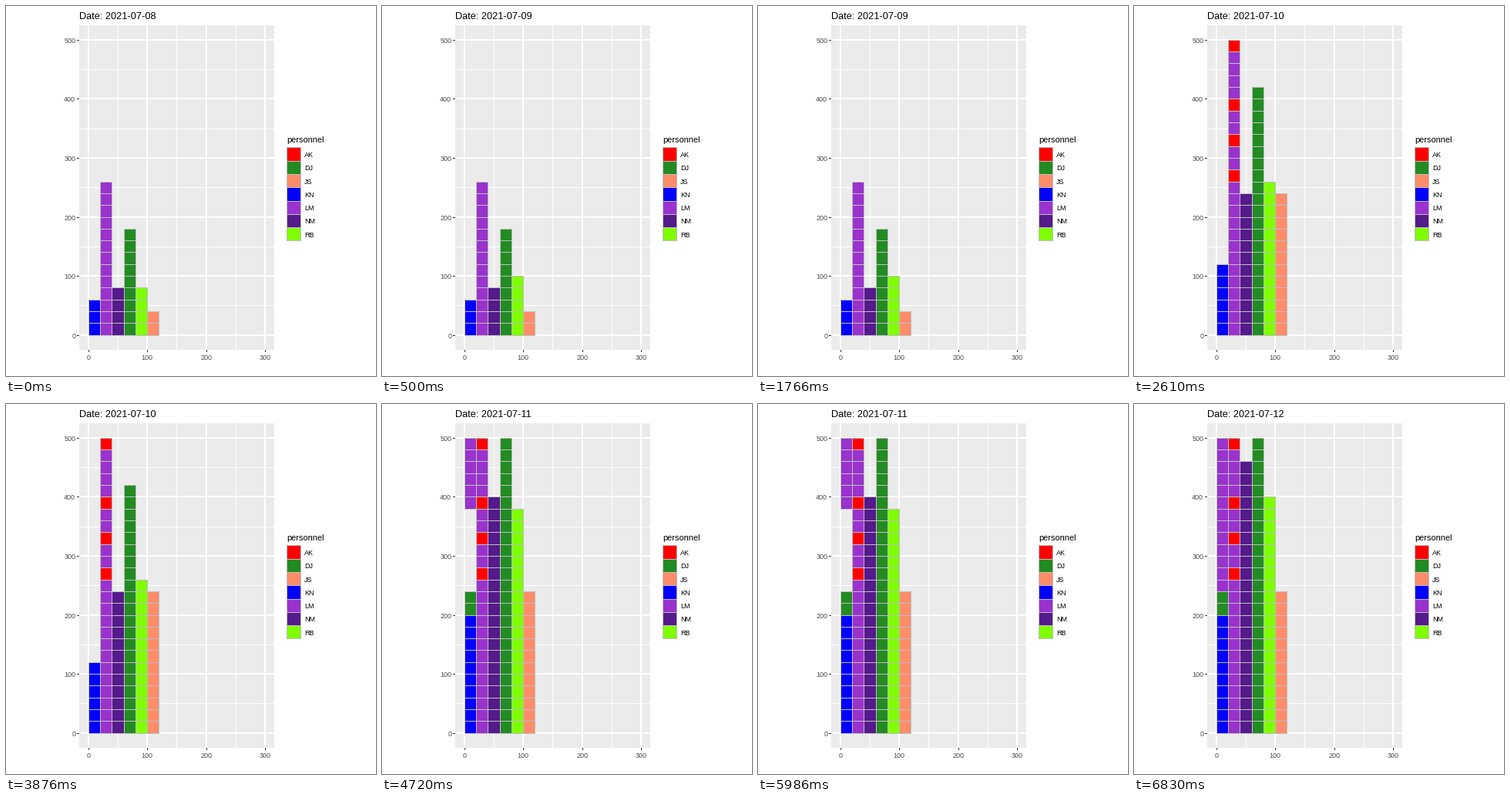
A matplotlib script that plays this animation: 480 by 480 pixels, repeating every 8000 ms.

```python
import matplotlib.pyplot as plt
from matplotlib.animation import FuncAnimation
from matplotlib.collections import PolyCollection

plt.rcParams["font.family"] = "Liberation Sans"

SIZE, STEP, LOOP = 480, 20, 8000
SCALE, X0, Y0 = 0.766, 106.55, 426.72
TILE = 20
BORDER = "#BEBEBE"
COLORS = {
    "AK": "#FF0000", "DJ": "#228B22", "JS": "#FF8C69", "KN": "#0000FF",
    "LM": "#9A32CD", "NM": "#551A8B", "RB": "#7FFF00",
}

# Each column is a list of (person, tile count) runs from the bottom up.
LM_START = [("LM", 13)]
LM_FULL = [("LM", 13), ("AK", 1), ("LM", 2), ("AK", 1),
           ("LM", 2), ("AK", 1), ("LM", 4), ("AK", 1)]
KN_DONE = [("KN", 10), ("DJ", 2)]


def day(first, second, nm, dj, rb, js):
    return [first, second, [("NM", nm)], [("DJ", dj)], [("RB", rb)], [("JS", js)]]


# (start in ms, date, columns)
DAYS = [
    (0, "2021-07-08", day([("KN", 3)], LM_START, 4, 9, 4, 2)),
    (500, "2021-07-09", day([("KN", 3)], LM_START, 4, 9, 5, 2)),
    (2610, "2021-07-10", day([("KN", 6)], LM_FULL, 12, 21, 13, 12)),
    (4720, "2021-07-11", day(KN_DONE + [(None, 7), ("LM", 6)], LM_FULL, 20, 25, 19, 12)),
    (6830, "2021-07-12", day(KN_DONE + [("LM", 13)], LM_FULL, 23, 25, 20, 12)),
]


def px(value):
    return round(X0 + SCALE * value)


def py(value):
    return round(Y0 - SCALE * value)


def rect(left, top, right, bottom):
    return [(left, top), (right, top), (right, bottom), (left, bottom)]


def bordered(left, top, right, bottom, color):
    """A filled box whose one-pixel border lies on the given pixel edges."""
    return [(rect(left, top, right + 1, bottom + 1), BORDER),
            (rect(left + 1, top + 1, right, bottom), color)]


def tiles(columns):
    shapes = []
    for i, runs in enumerate(columns):
        level = 0
        for person, count in runs:
            for _ in range(count):
                if person:
                    shapes += bordered(px(i * TILE), py(level + TILE),
                                       px((i + 1) * TILE), py(level), COLORS[person])
                level += TILE
    return shapes


def panel():
    left, right, top, bottom = px(-15), px(315), py(525), py(-25)
    shapes = [(rect(left, top, right, bottom), "#EBEBEB")]
    for v in range(50, 500, 100):
        shapes.append((rect(left, py(v), right, py(v) + 1), "white"))
        if v < 300:
            shapes.append((rect(px(v), top, px(v) + 1, bottom), "white"))
    for v in range(0, 501, 100):
        y = py(v)
        shapes.append((rect(left, y - 1, right, y + 1), "white"))
        shapes.append((rect(left - 3, y, left, y + 1), "#333333"))
        if v <= 300:
            x = px(v)
            shapes.append((rect(x - 1, top, x + 1, bottom), "white"))
            shapes.append((rect(x, bottom, x + 1, bottom + 3), "#333333"))
    return shapes


def legend_keys():
    edges = [round(183.4 + 17.28 * i) for i in range(len(COLORS) + 1)]
    shapes = []
    for top, bottom, color in zip(edges, edges[1:], COLORS.values()):
        shapes += bordered(364, top, 382, bottom, color)
    return shapes


def add_shapes(shapes, zorder):
    polys, colors = zip(*shapes)
    collection = PolyCollection(polys, facecolors=colors, linewidths=0,
                                antialiaseds=False, zorder=zorder)
    ax.add_collection(collection, autolim=False)
    return collection


def label(x, y, text, size, color="black", ha="left"):
    return ax.text(x, y, text, fontsize=size, color=color, ha=ha, va="baseline")


fig = plt.figure(figsize=(SIZE / 72, SIZE / 72), dpi=72, facecolor="white")
ax = fig.add_axes([0, 0, 1, 1])
ax.set_xlim(0, SIZE)
ax.set_ylim(SIZE, 0)
ax.axis("off")

add_shapes(panel() + legend_keys(), 1)
for v in range(0, 501, 100):
    label(90.3, py(v) + 4, str(v), 9, "#4D4D4D", "right")
    if v <= 300:
        label(px(v), 459, str(v), 9, "#4D4D4D", "center")
label(364.3, 177, "personnel", 11)
for i, person in enumerate(COLORS):
    label(387, round(196 + 17.28 * i), person, 9)

title = label(95, 17, "", 12.75)
day_shapes = [add_shapes(tiles(columns), 2) for _, _, columns in DAYS]


def update(frame):
    end = (frame + 1) * STEP
    current = sum(start < end for start, _, _ in DAYS) - 1
    for i, shapes in enumerate(day_shapes):
        shapes.set_visible(i == current)
    title.set_text("Date: " + DAYS[current][1])
    return [title, *day_shapes]


animation = FuncAnimation(fig, update, frames=LOOP // STEP, interval=STEP,
                          repeat=True, repeat_delay=0)
plt.show()
```
